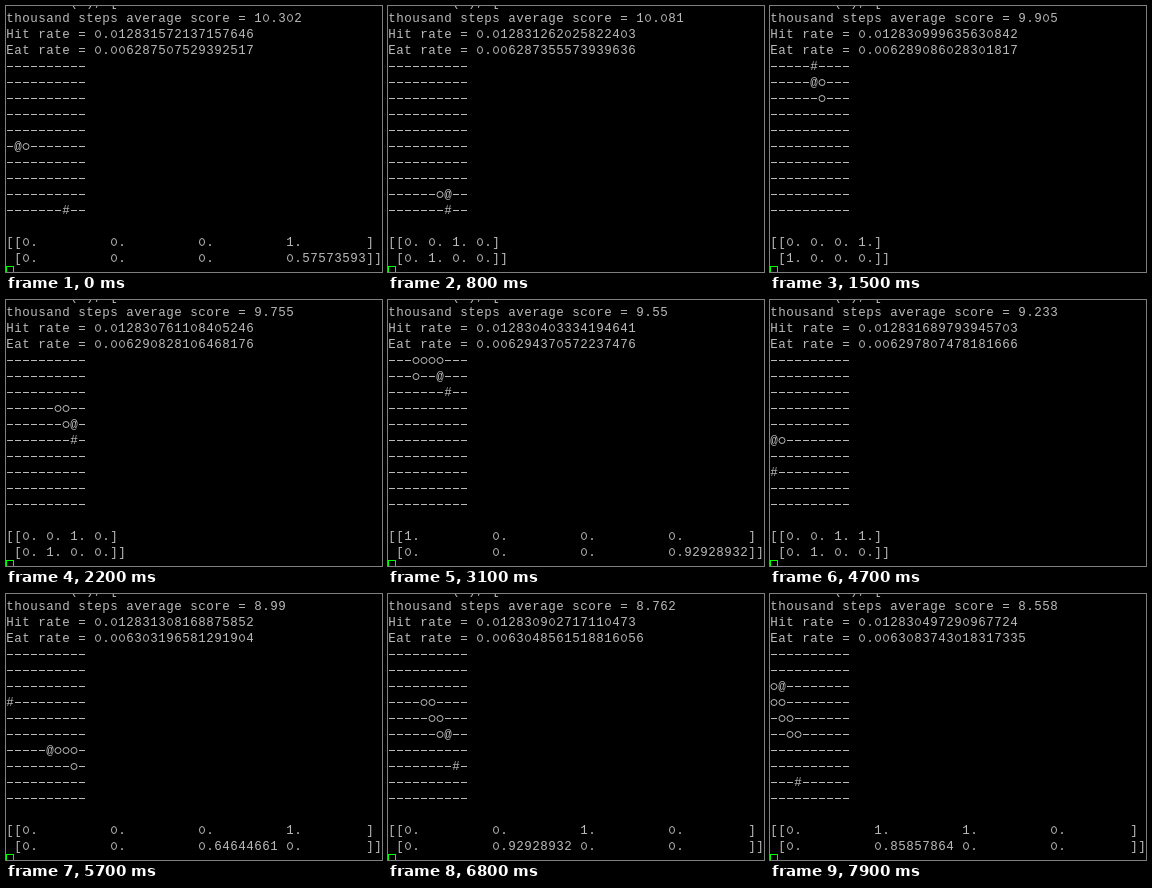
An HTML page with a canvas for the animation above (8 s loop, 376 by 266 pixels).

```html
<!DOCTYPE html>
<html lang="en">
<head>
<meta charset="utf-8">
<title>Snake training log</title>
<style>
  html, body { margin: 0; width: 100%; height: 100%; overflow: hidden; background: #000; }
  canvas { display: block; }
</style>
</head>
<body>
<canvas id="term" width="376" height="266"></canvas>
<script>
const SIZE = 10, CELL_W = 8, CELL_H = 16, TOP = 4;
const LOOP = 8000, TICK = 100;
const ctx = document.getElementById('term').getContext('2d');

// Stops of the head as [row, col, isFood]; null is a crash and restart.
const ROUTE = [
  [5, 0], [4, 0], [9, 7, 1],
  [9, 6], [0, 5, 1],
  [0, 4], [2, 4], [5, 8, 1],
  [5, 6], [0, 3, 1], [2, 7, 1], [0, 0, 1],
  [0, 4], [1, 4], [1, 3], null,
  [5, 0], [7, 0, 1], [8, 4, 1], [6, 8, 1], [3, 0, 1], [7, 8, 1], [2, 0, 1],
  [2, 1], [8, 3, 1]
];

// [tick, game step]: the screen is sampled slower than the game runs.
const PACE = [[0, 0], [8, 13], [22, 34], [31, 49], [47, 73], [68, 106], [79, 123]];

// Walk along the longer axis first; ties go sideways.
function advance([r, c], [tr, tc]) {
  const dr = tr - r, dc = tc - c;
  return Math.abs(dc) >= Math.abs(dr) ? [r, c + Math.sign(dc)] : [r + Math.sign(dr), c];
}

function simulate(count) {
  let snake = [[5, 1], [5, 2]];
  let steps = 537892, hits = 6902, eats = 3382, sum = 10302, leg = 0;
  const states = [];
  const save = () => {
    const food = ROUTE.slice(leg).find(p => p && p[2]);
    states.push({ snake: snake.slice(), food, steps, hits, eats, sum });
  };
  save();
  for (let k = 1; k <= count; k++) {
    const goal = ROUTE[leg];
    steps++;
    if (!goal) {
      snake = [[5, 6], [5, 7]];
      hits++;
      leg++;
    } else {
      const head = advance(snake[0], goal);
      const there = head[0] === goal[0] && head[1] === goal[1];
      snake = [head, ...snake];
      if (there && goal[2]) eats++;
      else snake.pop();
      if (there) leg++;
    }
    sum += snake.length - 2 - 17;
    save();
  }
  return states;
}

// Sensor rows in the order up, down, left, right.
function sense({ snake, food }) {
  const [r, c] = snake[0];
  const blocked = (y, x) =>
    y < 0 || x < 0 || y >= SIZE || x >= SIZE || snake.some(p => p[0] === y && p[1] === x);
  const walls = [[-1, 0], [1, 0], [0, -1], [0, 1]].map(([y, x]) => +blocked(r + y, c + x));
  const dr = food[0] - r, dc = food[1] - c;
  const smell = [0, 0, 0, 0];
  const dir = Math.abs(dc) >= Math.abs(dr) ? (dc < 0 ? 2 : 3) : (dr < 0 ? 0 : 1);
  smell[dir] = 1 - Math.abs(dc) / Math.hypot(SIZE, SIZE);
  return [walls, smell];
}

function formatMatrix(rows) {
  const text = rows.map(row => row.map(v => v.toFixed(8).replace(/0+$/, '')));
  const width = Math.max(...text.flat().map(s => s.length));
  const [a, b] = text.map(row => row.map(s => s.padEnd(width)).join(' '));
  return ['[[' + a + ']', ' [' + b + ']]'];
}

function screen(s) {
  const grid = Array.from({ length: SIZE }, () => Array(SIZE).fill('-'));
  grid[s.food[0]][s.food[1]] = '#';
  s.snake.forEach(([r, c], i) => { grid[r][c] = i ? 'O' : '@'; });
  return [
    'thousand steps average score = ' + s.sum / 1000,
    'Hit rate = ' + s.hits / s.steps,
    'Eat rate = ' + s.eats / s.steps,
    ...grid.map(row => row.join('')),
    '',
    ...formatMatrix(sense(s))
  ];
}

function ring(x, y, rx, ry) {
  ctx.beginPath();
  ctx.ellipse(x, y, rx, ry, 0, 0, Math.PI * 2);
  ctx.stroke();
}

// Dash, zero and O are drawn as thin shapes, the rest as text.
function drawChar(ch, x, y) {
  if (ch === '-') ctx.fillRect(x + 1, y + 8, 6, 1);
  else if (ch === '0') ring(x + 4, y + 8, 2.5, 3.5);
  else if (ch === 'O') ring(x + 4, y + 8.5, 3, 3);
  else if (ch !== ' ') ctx.fillText(ch, x + 4, y + 12);
}

function drawLine(line, row) {
  [...line].forEach((ch, col) => drawChar(ch, col * CELL_W, TOP + row * CELL_H));
}

function draw(lines) {
  ctx.fillStyle = '#000';
  ctx.fillRect(0, 0, 376, 266);
  ctx.fillStyle = ctx.strokeStyle = '#bbb';
  ctx.lineWidth = 1;
  ctx.textAlign = 'center';
  ctx.font = '12.5px "Liberation Mono", monospace';
  drawLine('        (1), [', -1); // scrolled out, only the descenders show
  lines.forEach(drawLine);
  ctx.strokeStyle = '#0f0';
  ctx.strokeRect(0.5, TOP + lines.length * CELL_H + 0.5, CELL_W - 1, CELL_H - 1);
}

function stepAt(tick) {
  const i = PACE.findIndex(p => p[0] >= tick);
  if (i === 0) return 0;
  const [t0, k0] = PACE[i - 1], [t1, k1] = PACE[i];
  return Math.round(k0 + (k1 - k0) * (tick - t0) / (t1 - t0));
}

const states = simulate(123);
const start = performance.now();
let shown = -1;

function frame() {
  const t = Math.max(0, performance.now() - start) % LOOP;
  const tick = Math.floor(t / TICK);
  if (tick !== shown) {
    shown = tick;
    draw(screen(states[stepAt(tick)]));
  }
  requestAnimationFrame(frame);
}
frame();
</script>
</body>
</html>
```
